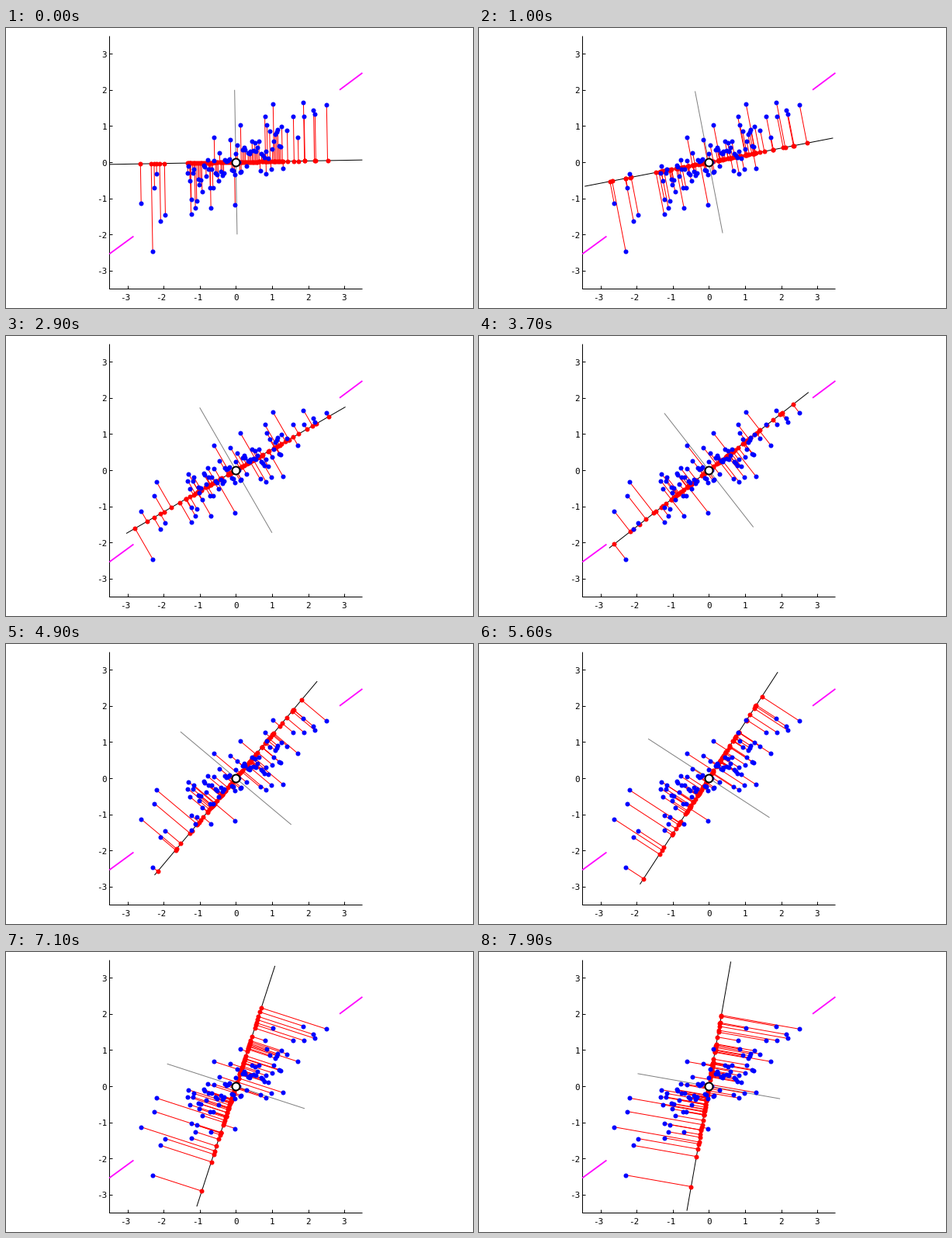
Animation of 602 by 361 pixels, one loop 8000 ms. Source, as a matplotlib script:

```python
import numpy as np
import matplotlib.pyplot as plt
from matplotlib.animation import FuncAnimation
from matplotlib.collections import LineCollection

W, H, DPI = 602, 361, 64
PX = 72 / DPI                       # one pixel in points
ORIGIN = np.array([296.3, 173])     # plot centre in stage pixels
UNIT = 46.6                         # pixels per data unit
LIMIT = 3.5
FRAMES, INTERVAL = 80, 100

# Outer points that shape the cloud, in data units
OUTER = [
    (-2.62, -1.13), (-2.30, -2.46), (-2.25, -0.70), (-2.19, -0.33),
    (-2.08, -1.64), (-1.95, -1.45), (-1.33, -0.29), (-1.31, -0.10),
    (-1.24, -1.43), (-0.69, -1.26), (-0.60, 0.68), (-0.02, -1.17),
    (0.13, 1.02), (0.80, 1.26), (0.84, -0.33), (1.03, 1.60),
    (1.31, -0.18), (1.42, 0.89), (1.59, 1.26), (1.72, 0.68),
    (1.87, 1.66), (1.89, 1.26), (2.15, 1.43), (2.19, 1.32), (2.51, 1.58),
]
CORE_COUNT = 69


def make_samples():
    """Outer points plus a seeded, correlated core."""
    rng = np.random.default_rng(42)
    x = np.linspace(-1.27, 1.27, CORE_COUNT)
    spread = np.clip(rng.normal(0, 0.4, CORE_COUNT), -0.7, 0.7)
    return np.vstack([OUTER, np.column_stack([x, 0.5 * x + spread])])


def to_stage(xy):
    return ORIGIN + np.asarray(xy) * (UNIT, -UNIT)


def line(points, color, width=1, z=2):
    """Line through points given in data units."""
    return ax.plot(*to_stage(points).T, color=color, lw=width * PX, zorder=z,
                   solid_capstyle="butt")[0]


def dots(points, color, z):
    return ax.plot(*to_stage(points).T, "o", color=color, ms=6 * PX, mew=0,
                   zorder=z)[0]


samples = make_samples()

fig = plt.figure(figsize=(W / DPI, H / DPI), dpi=DPI, facecolor="white")
ax = fig.add_axes([0, 0, 1, 1])
ax.set_xlim(0, W)
ax.set_ylim(H, 0)
ax.axis("off")

# Axes with inward ticks
line([(-LIMIT, LIMIT), (-LIMIT, -LIMIT), (LIMIT, -LIMIT)], "black")
tick = -LIMIT + 4 / UNIT
label = dict(family="DejaVu Sans Mono", fontsize=11 * PX, color="black",
             va="center_baseline")
for v in range(-3, 4):
    x, y = to_stage((v, v))
    line([(v, -LIMIT), (v, tick)], "black")
    line([(-LIMIT, v), (tick, v)], "black")
    ax.text(x - (3 if v < 0 else 0), 347, str(v), ha="center", **label)
    ax.text(130, y + 0.5, str(v), ha="right", **label)

# Principal direction marks
line([(-3.5, -2.54), (-2.83, -2.05)], "magenta", 1.8)
line([(2.87, 2.0), (3.5, 2.47)], "magenta", 1.8)

normal = line([(0, 0)], "0.5", z=3)
axis = line([(0, 0)], "black", z=3)
links = LineCollection([], colors="red", linewidths=PX, zorder=4)
ax.add_collection(links, autolim=False)
feet = dots(samples, "red", 5)
dots(samples, "blue", 6)
ax.plot(*ORIGIN, "o", ms=10 * PX, mfc="white", mec="black", mew=2 * PX,
        zorder=7)


def update(i):
    angle = np.radians(i + 1)       # one degree per step
    along = np.array([np.cos(angle), np.sin(angle)])
    across = np.array([-along[1], along[0]])
    foot = np.outer(samples @ along, along)

    axis.set_data(*to_stage([-LIMIT * along, LIMIT * along]).T)
    normal.set_data(*to_stage([-2 * across, 2 * across]).T)
    links.set_segments(to_stage(np.stack([samples, foot], axis=1)))
    feet.set_data(*to_stage(foot).T)
    return axis, normal, links, feet


anim = FuncAnimation(fig, update, frames=FRAMES, interval=INTERVAL,
                     repeat=True, repeat_delay=0, blit=False)
plt.show()
```
